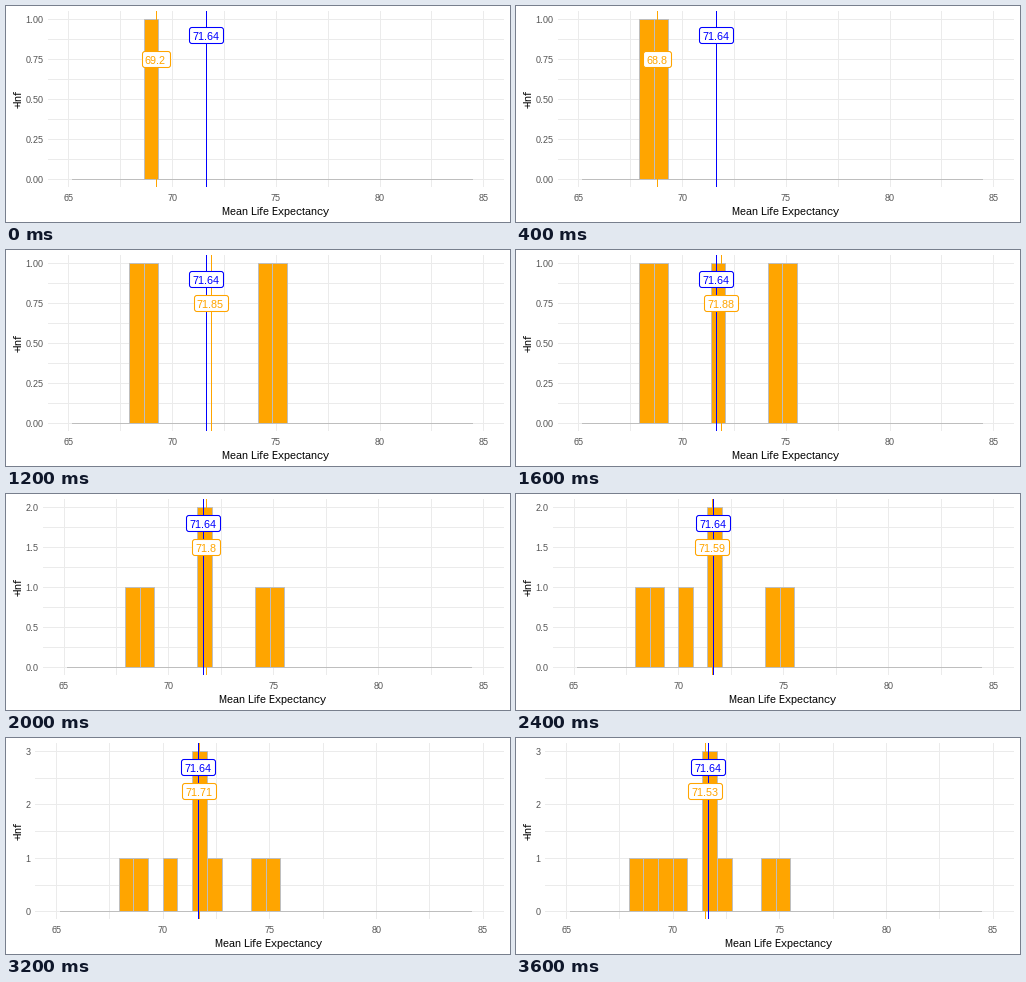
A matplotlib script for the animation above (4 s loop, 504 px wide and 216 px high).

```python
import math
import numpy as np
import matplotlib.pyplot as plt
from matplotlib.animation import FuncAnimation
from matplotlib.patches import FancyBboxPatch, Rectangle

plt.rcParams.update({
    "font.family": "Liberation Sans",
    "text.hinting": "default",
    "text.hinting_factor": 1,
    "toolbar": "None",
})

W, H = 504, 216
TOP, BOTTOM, RIGHT = 5, 181, 498.48
ZERO, PLOT_H = 173.7, 160.1
X_MIN, X_MAX = 64, 86
BIN = 20 / 29
POP_MEAN = 71.64

GRID, EDGE, TICK = "#ebebeb", "#bebebe", "#4d4d4d"
ORANGE, BLUE = "#ffa500", "#0000ff"

SAMPLES = [69.2, 68.4, 75.1, 74.7, 72.0, 71.4, 70.3, 71.6, 72.7, 69.9]

# highest count -> (panel left, tick step, tick format)
LAYOUT = {1: (42.2, 0.25, "%.2f"), 2: (37.1, 0.5, "%.1f"), 3: (29.2, 1, "%d")}

fig = plt.figure(figsize=(W / 72, H / 72), dpi=72, facecolor="white")
ax = fig.add_axes([0, 0, 1, 1])


def pixel(v):
    return math.floor(v) + 0.5


def rect(x, y, w, h, z, **style):
    ax.add_patch(Rectangle((x, y), w, h, zorder=z, snap=False, **style))


def vline(x, color, z):
    rect(math.floor(x), TOP, 1, BOTTOM - TOP, z, fc=color, lw=0)


def hline(x0, x1, y, color, z):
    x0, x1 = math.floor(x0), math.floor(x1)
    rect(x0, math.floor(y), x1 - x0, 1, z, fc=color, lw=0)


def write(x, y, s, size=11, color="black", **kw):
    ax.text(x, y, s, fontsize=size, color=color, va="baseline", zorder=9, **kw)


def tag(x, y, value, color):
    s = f"{round(value, 2):g}"
    half = 2.2 + 3.06 * len(s)
    ax.add_patch(FancyBboxPatch(
        (round(x - half) + 0.5, y - 8), round(2 * half) - 1, 16,
        boxstyle="round,pad=0,rounding_size=2.5",
        fc="white", ec=color, lw=1.07, zorder=8))
    write(x - 0.7, y + 4.5, s, color=color, ha="center")


def draw(i):
    ax.clear()
    ax.set(xlim=(0, W), ylim=(H, 0))
    ax.axis("off")

    data = SAMPLES[:i + 1]
    mean = sum(data) / len(data)
    bins, counts = np.unique(np.round(np.array(data) / BIN), return_counts=True)
    peak = int(counts.max())
    left, step, fmt = LAYOUT[peak]

    def px(v):
        return left + (v - X_MIN) / (X_MAX - X_MIN) * (RIGHT - left)

    def py(v):
        return ZERO - v / peak * PLOT_H

    for v in np.arange(65, 86, 2.5):
        vline(px(v), GRID, 1)
    for v in range(65, 86, 5):
        write(px(v) - 0.3, 195, str(v), 9, TICK, ha="center")
    for v in np.arange(0, peak + 0.01, step / 2):
        hline(left, RIGHT, py(v), GRID, 1)
    for v in np.arange(0, peak + 0.01, step):
        write(left - 4.6, round(py(v) + 3.5), fmt % v, 9, TICK, ha="right")

    for b, n in zip(bins, counts):
        x0, x1 = (pixel(px((b + d) * BIN)) for d in (-0.5, 0.5))
        y0, y1 = pixel(py(n)), pixel(ZERO)
        rect(x0, y0, x1 - x0, y1 - y0, 3, fc=ORANGE, ec=EDGE, lw=1)
    hline(px(94.5 * BIN), px(122.5 * BIN), ZERO, EDGE, 4)

    vline(px(mean), ORANGE, 5)
    vline(px(POP_MEAN), BLUE, 6)
    tag(px(POP_MEAN), 29.5, POP_MEAN, BLUE)
    tag(px(mean), 53.5, mean, ORANGE)

    write((left + RIGHT) / 2 - 1.2, 209, "Mean Life Expectancy", ha="center")
    write(16, 92.5, "+Inf", ha="center", rotation=90, rotation_mode="anchor")
    return []


anim = FuncAnimation(fig, draw, frames=len(SAMPLES), interval=400,
                     init_func=lambda: [], repeat=True, repeat_delay=0)
plt.show()
```
